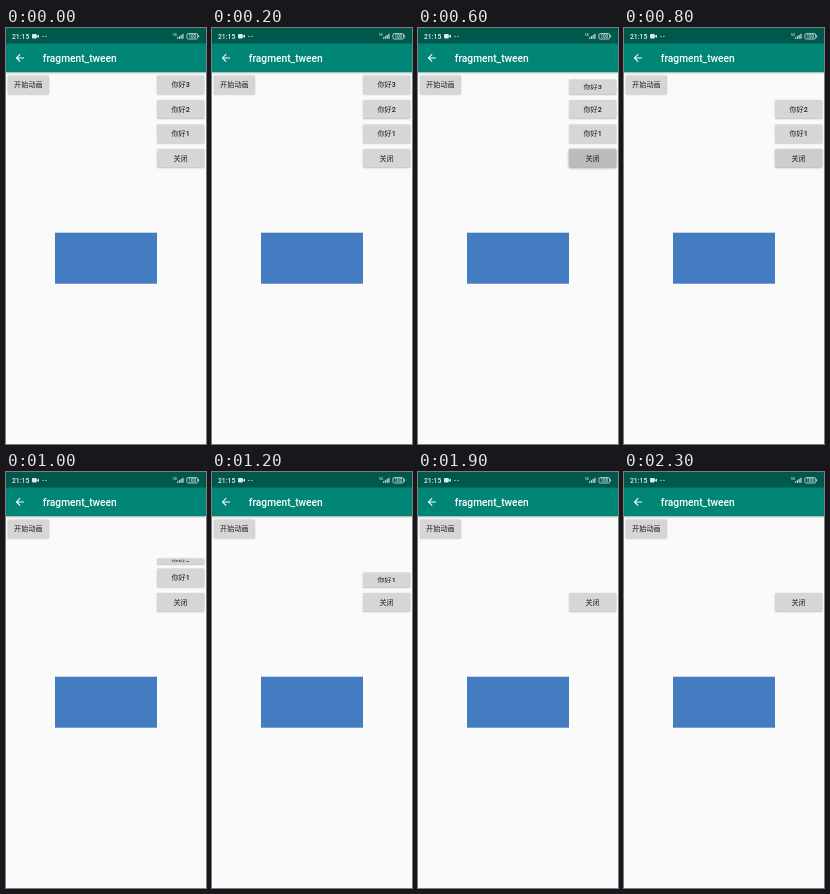
An HTML page with a canvas that plays this animation: 200 px wide and 416 px high, repeating every 2.5 s.

```html
<!DOCTYPE html>
<html lang="zh">
<head>
<meta charset="utf-8">
<style>
html, body { margin: 0; width: 100%; height: 100%; overflow: hidden; background: #fafafa; }
canvas { display: block; }
</style>
</head>
<body>
<canvas id="stage" width="200" height="416"></canvas>
<script>
const ctx = document.getElementById('stage').getContext('2d');
const LOOP = 2500, STEP = 100;
const COLLAPSE_START = 515, COLLAPSE_TIME = 300;
const ROW = 24.5, LIST_TOP = 44.5;
const LATIN = 'Roboto, "Noto Sans", sans-serif';
const CJK = 'Roboto, "Noto Sans CJK SC", "Noto Sans CJK", sans-serif';

const clamp = v => Math.min(1, Math.max(0, v));
const ease = t => 0.5 - Math.cos(Math.PI * t) / 2;

function rect(x, y, w, h, color) {
  ctx.fillStyle = color;
  ctx.fillRect(x, y, w, h);
}

function rounded(x, y, w, h, r, color) {
  ctx.fillStyle = color;
  ctx.beginPath();
  ctx.roundRect(x, y, w, h, r);
  ctx.fill();
}

function text(str, x, y, font, color, align = 'left') {
  ctx.font = font;
  ctx.fillStyle = color;
  ctx.textAlign = align;
  ctx.fillText(str, x, y);
}

// scaleY shrinks the button toward the bottom edge of its row
function button(label, x, top, w, scaleY = 1, press = 0) {
  if (scaleY < 0.01) return;
  ctx.save();
  ctx.translate(0, top + ROW);
  ctx.scale(1, scaleY);
  ctx.translate(0, -ROW);
  ctx.save();
  ctx.shadowColor = `rgba(0,0,0,${0.28 + press * 0.15})`;
  ctx.shadowBlur = 1.6 + press;
  ctx.shadowOffsetY = 0.6 * scaleY;
  const shade = Math.round(214 - 27 * press);
  rounded(x, 3, w, 18.4, 1, `rgb(${shade},${shade},${shade})`);
  ctx.restore();
  text(label, x + w / 2, 14.9, `500 7.15px ${CJK}`, '#1d1d1d', 'center');
  ctx.restore();
}

function statusBar() {
  rect(0, 0, 200, 15.5, '#00574b');
  text('21:15', 6, 10.7, `500 6.8px ${LATIN}`, '#e4efed');
  const ink = '#dcebe8';
  rounded(26, 6, 4.8, 4.4, 0.8, ink);
  ctx.beginPath();
  ctx.moveTo(30.5, 8.2);
  ctx.lineTo(33, 6.4);
  ctx.lineTo(33, 10);
  ctx.fill();
  rect(36.4, 7.9, 1.1, 1.1, ink);
  rect(39.4, 7.9, 1.1, 1.1, ink);
  text('5G', 167, 8.2, `500 3px ${LATIN}`, ink);
  for (let i = 0; i < 4; i++) rect(171 + i * 1.8, 9.4 - i * 1.2, 1.1, 1.4 + i * 1.2, ink);
  ctx.strokeStyle = ink;
  ctx.lineWidth = 0.8;
  ctx.beginPath();
  ctx.roundRect(180.9, 5.6, 10.8, 5.4, 1.4);
  ctx.stroke();
  rect(192.2, 7.3, 0.9, 2, ink);
  text('100', 186.3, 9.9, `500 4.5px ${LATIN}`, ink, 'center');
}

function toolbar() {
  ctx.save();
  ctx.shadowColor = 'rgba(0,0,0,0.25)';
  ctx.shadowBlur = 2;
  ctx.shadowOffsetY = 0.6;
  rect(0, 15, 200, 29.2, '#008577');
  ctx.restore();
  ctx.strokeStyle = '#fff';
  ctx.lineWidth = 1.05;
  ctx.beginPath();
  ctx.moveTo(18, 29.9);
  ctx.lineTo(10.8, 29.9);
  ctx.moveTo(14.2, 26.2);
  ctx.lineTo(10.5, 29.9);
  ctx.lineTo(14.2, 33.6);
  ctx.stroke();
  text('fragment_tween', 36.8, 33.5, `500 10.2px ${LATIN}`, '#fff');
}

function pressAt(t) {
  return t < 600 ? clamp((t - 430) / 120) : clamp(1 - (t - 600) / 300);
}

function draw(t) {
  rect(0, 0, 200, 416, '#fafafa');
  toolbar();
  statusBar();
  rect(49, 204.7, 102, 51, '#437cc0');
  button('开始动画', 1.9, LIST_TOP, 41);
  ['你好3', '你好2', '你好1'].forEach((label, i) => {
    const start = COLLAPSE_START + i * COLLAPSE_TIME;
    const scaleY = 1 - ease(clamp((t - start) / COLLAPSE_TIME));
    button(label, 151, LIST_TOP + i * ROW, 47.2, scaleY);
  });
  button('关闭', 151, LIST_TOP + 3 * ROW, 47.2, 1, pressAt(t));
}

function frame() {
  const t = performance.now() % LOOP;
  draw(Math.floor(t / STEP) * STEP);
  requestAnimationFrame(frame);
}
frame();
</script>
</body>
</html>
```
